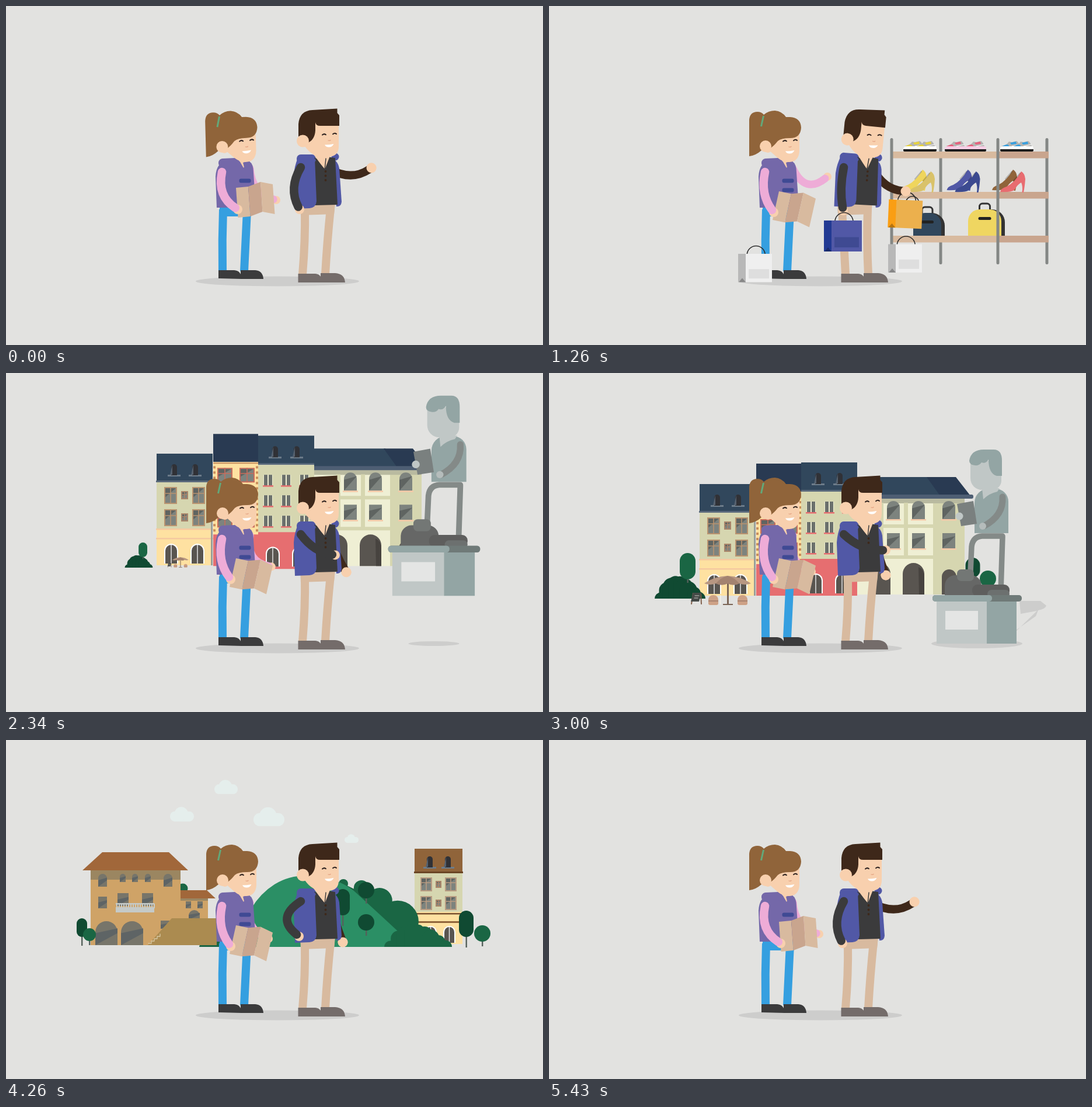
An HTML page with a canvas that plays this animation: 920 by 580 pixels, repeating every 5.46 s.

```html
<!DOCTYPE html>
<html>
<head>
<meta charset="utf-8">
<style>
html, body { margin: 0; width: 100%; height: 100%; overflow: hidden; background: #e2e2e0; }
canvas { display: block; }
</style>
</head>
<body>
<canvas id="stage" width="920" height="580"></canvas>
<script>
const g = document.getElementById('stage').getContext('2d');
const LOOP = 5460;
const SKIN = '#f8d0ae', DARK = '#3b3b3c', BROWN = '#3e281a', BLUE = '#5158a6', PINK = '#eeacd7', JEANS = '#359fe0',
  TAN = '#d8ba9f', TAN2 = '#c9a58e', SAND = '#d6d6b0', CREAM = '#efefd4', YELLOW = '#fee1a1', RED = '#e66e70',
  NAVY = '#31475c', NAVY2 = '#293a52', SHADE = '#cdcdcc', PINE = '#104a32', LEAF = '#1a6644',
  STONE = '#93a5a4', PALE = '#c0c7c6', IRON = '#848a88', ROOF = '#90643a', GLASS = '#7d837e', GLASS2 = '#5f6461';
let t = 0;

// ---- drawing helpers
function fill(d, color) { g.fillStyle = color; g.fill(new Path2D(d)); }
function line(d, color, w, cap = 'round') {
  g.strokeStyle = color; g.lineWidth = w; g.lineCap = cap; g.lineJoin = 'round';
  g.stroke(new Path2D(d));
}
function box(x, y, w, h, color, r = 0) {
  g.fillStyle = color; g.beginPath(); g.roundRect(x, y, w, h, r); g.fill();
}
function oval(x, y, rx, ry, color) {
  g.fillStyle = color; g.beginPath(); g.ellipse(x, y, rx, ry, 0, 0, 7); g.fill();
}
const dot = (x, y, r, color) => oval(x, y, r, r, color);
const arch = (x, y, w, h, color) => box(x, y, w, h, color, [w / 2, w / 2, 0, 0]);
function group(px, py, s, dx, dy, draw, angle = 0) {
  if (s <= 0) return;
  g.save();
  g.translate(px + dx, py + dy);
  g.rotate(angle * Math.PI / 180);
  g.scale(s, s);
  g.translate(-px, -py);
  draw();
  g.restore();
}

// ---- timing helpers
const part = (start, len) => Math.min(1, Math.max(0, (t - start) / len));
function pop(start, len = 260) {
  const q = 1 - part(start, len);
  return q < 1 ? 1 + 1.7 * q * q - 2.7 * q ** 3 : 0;
}
const drop = (start, height, len = 300) => -height * (1 - part(start, len) ** 3);
const pan = start => -950 * part(start, 450) ** 3;

// Poses for waiting, shop, town and hill; each cue eases to the next one.
const CUES = [150, 1750, 3100, 4600];
function pose(stances, len = 810) {
  return stances[0].map((first, j) => CUES.reduce((v, cue, i) => {
    const p = part(cue, len);
    return v + (stances[(i + 1) % 4][j] - stances[i][j]) * p * p * (3 - 2 * p);
  }, first));
}

// ---- shop
function sneaker(x, accent, mid) {
  group(0, 0, 1, x, 249, () => {
    box(0, -5, 37, 5, '#1c1c1c', 2);
    fill('M0 -4Q0 -9 6 -9H36L37 -4Z', mid);
    fill('M2 -9Q11 -11 15 -17L20 -16L28 -18Q31 -17 34 -9Z', '#b4b4b2');
    fill('M3 -9Q9 -12 13 -12L16 -9ZM17 -15L27 -17L28 -13L19 -12Z', accent);
    line('M20 -9L33 -12', '#fff', 1);
  });
}
function heel(x, y, color) {
  group(0, 0, 1, x, y, () => {
    fill('M0 -1Q1 -7 11 -10Q25 -17 36 -36Q42 -33 43 -23Q42 -9 40 0H37.5Q39 -11 36 -17Q30 -14 24 -4Q18 0 0 -1Z', color);
    line('M23 -20L34 -33', '#0003', 2);
  });
}
function purse(x, top, w, color) {
  const h = 393 - top, c = x + w / 2;
  g.strokeStyle = '#333'; g.lineWidth = 3;
  g.beginPath(); g.roundRect(c - 9, top - 10, 18, 16, 5); g.stroke();
  box(x + 10, top, w - 4, h, '#333', [18, 22, 0, 0]);
  box(x, top, w, h, color, [20, 20, 0, 0]);
  box(c - 11, top + 13, 22, 5, '#222', 2.5);
}
function bag(x, y, w, h, side, front, label) {
  const c = x + w * .53, r = 15.5;
  line(`M${c - r} ${y + 2}A${r} ${r} 0 0 1 ${c + r} ${y + 2}`, '#2c2c2c', 1.6);
  box(x, y, 14, h, side);
  box(x + 13, y, w - 13, h, front);
  fill(`M${x + 1} ${y + h}l6 -7l6 7Z`, '#0004');
  if (label) box(x + 18, y + h * .54, w - 23, h * .33, label);
}
function whiteBag(x, y, start) {
  group(x + 29, y + 48, pop(start), pan(1652), 0, () => bag(x, y, 58, 48.5, '#b8b8b8', '#efefef', '#dedede'));
}
const heldBag = start => Math.min(pop(start), 1 - part(1680, 220));
const post = x => box(x - 2.5, 226, 5, 216, '#848785', 2.5);
function shop() {
  group(720, 334, pop(60), pan(1652), drop(340, 97), () => {
    post(671); post(853);
    for (const y of [249, 318, 393]) {
      box(585, y, 184, 11.5, TAN);
      box(769, y, 87, 11.5, TAN2);
    }
    [['#e8d33c', '#fff'], ['#e8607e', '#f8cfe6'], [JEANS, '#fff']].forEach(([accent, mid], i) => {
      const x = 607 + i * 83 - i % 2 * 12, gap = 20 + i % 2 * 14;
      group(x + 28, 249, pop(430 + i * 50), 0, 0, () => { sneaker(x, accent, mid); sneaker(x + gap, accent, mid); });
    });
    [['#efd55c', '#d9c26a'], [BLUE, '#3c4a90'], [ROOF, '#e86c70']].forEach(([rear, front], i) => {
      const x = 618 + i * 77.5;
      group(x + 15, 318, pop(500 + i * 50), 0, 0, () => { heel(x - 14, 316, rear); heel(x, 319, front); });
    });
    group(650, 393, pop(560), 0, 0, () => purse(624, 354, 48, NAVY));
    group(748, 393, pop(610), 0, 0, () => purse(718, 348, 57, '#efd661'));
    post(587); post(769);
  });
  whiteBag(581, 407.5, 520);
}

// ---- town
function win(x, y, w, h, frame) {
  box(x, y, w, h, frame);
  box(x + 2, y + 2, w - 4, h - 4, GLASS);
  fill(`M${x + 2} ${y + h * .6}L${x + w - 2} ${y + 2}H${x + 2}Z`, GLASS2);
  box(x + w / 2 - .8, y, 1.6, h, frame);
  box(x, y + h * .35, w, 1.5, frame);
}
function dormer(x, y) {
  box(x - 11, y, 22, 3, '#6d7c8a');
  arch(x - 5, y - 18, 10, 19, '#303136');
  fill(`M${x - 7} ${y}l4 -17v17Z`, '#55616f');
}
function shopArch(x, y, w = 24, h = 34) {
  arch(x, y, w, h, '#fff');
  arch(x + 2, y + 2, w - 4, h - 2, '#595550');
  box(x + w / 2 - .7, y + 2, 1.4, h - 2, '#eee');
}
function tallWindow(x, y, h, shape) {
  shape(x, y, 22, h, GLASS);
  fill(`M${x} ${y + h}V${y + h * .4}L${x + 22} ${y + h * .2}Z`, GLASS2);
  box(x - 2, y + h, 26, 2.5, '#f5c9a8');
}
function houseA() {
  box(258, 190, 96, 47, NAVY);
  box(257, 236, 98, 3, '#5b6a7c');
  box(258, 239, 96, 80, SAND);
  box(258, 319, 96, 62, YELLOW);
  for (const y of [318, 334]) box(257, y, 98, 2.5, '#f5c9a0');
  for (const x of [288, 324]) dormer(x, 226);
  for (const y of [247, 285]) {
    for (const x of [271, 319]) win(x, y, 22, 29, '#b9936f');
    win(300, y + 7, 12, 14, '#a9856a');
  }
  shopArch(271, 344); shopArch(316, 344);
  box(351, 239, 3, 142, '#9aa09a');
}
function houseB() {
  box(355, 155, 77, 48, NAVY2);
  box(355, 203, 77, 125, YELLOW);
  box(355, 204, 77, 2, '#c98f5c');
  for (let y = 210; y < 326; y += 9) for (const x of [355, 428]) box(x, y, 4, 4, '#c98f5c');
  for (const y of [213, 250, 290]) for (const x of [362, 400]) win(x, y, 26, 25, '#c96c5c');
  box(355, 327, 77, 54, RED);
}
function houseC() {
  box(432, 153, 96, 48, NAVY);
  box(432, 200, 96, 3, '#5b6a7c');
  box(432, 203, 96, 115, SAND);
  box(432, 318, 96, 63, RED);
  for (const x of [461, 498]) dormer(x, 189);
  for (const y of [220, 255, 290]) for (const x of [441, 472, 503]) {
    box(x, y, 16, 19, CREAM);
    for (const pane of [1, 9]) box(x + pane, y, 6, 19, '#6b706c');
    box(x - 1, y + 18, 18, 2.5, RED);
  }
  shopArch(445, 343); shopArch(490, 343);
}
function houseD() {
  box(528, 209, 130, 170, CREAM);
  box(658, 209, 54, 170, SAND);
  box(528, 214, 184, 9, '#b9baa0');
  fill('M528 178H650L672 210H528Z', NAVY);
  fill('M647 178H697L722 210H670Z', NAVY2);
  box(528, 208, 199, 7, '#4e5e73', [0, 3, 3, 0]);
  for (const y of [259, 312]) box(528, y, 130, 6, SAND);
  for (const x of [566, 608]) box(x, 222, 7, 94, SAND);
  for (const x of [579, 622, 674]) { tallWindow(x, 219, 31, arch); tallWindow(x, 274, 26, box); }
  for (const x of [548, 606]) arch(x, 325, 37, 54, '#595550');
  fill('M633 332Q643 336 643 350V379H634Z', '#47433f');
  arch(673, 336, 25, 43, '#595550');
}
function tree(x, y, w, h, trunk, color) {
  box(x - 1, y + h / 2, 2.4, trunk - y - h / 2, '#55605a');
  box(x - w / 2, y, w, h, color, w / 2);
}
// A mound of overlapping leaf balls on a flat base.
function clump(x, w, base, h, color, lean = .8) {
  for (let i = 0; i <= 8; i++) {
    const u = i / 8, r = h * (.27 + .13 * Math.sin(i * 2.3) ** 2);
    const cx = x + r + (w - 2 * r) * u, cy = base - (h - r) * Math.sin(Math.PI * u ** lean);
    box(cx - r, cy - r, 2 * r, base - cy + r, color, [r, r, 0, 0]);
  }
}
function bush() {
  clump(181, 87, 386, 39, PINE);
  tree(237.5, 308, 27, 45, 359, LEAF);
}
function cafe() {
  box(305, 355, 3, 41, '#7b6556');
  box(298, 395, 17, 2, '#7b6556');
  for (const x of [273, 323]) { box(x, 380, 17, 17, '#cda186', [8, 8, 3, 3]); box(x, 389, 17, 2, '#a98470'); }
  box(293, 380, 1.5, 16, '#f4f1e8');
  fill('M266 360Q283 348 306 347Q329 348 346 360q-10 4 -20 0q-10 5 -20 0q-10 5 -20 0q-10 4 -20 0Z', '#b79782');
  fill('M286 360Q294 350 306 347Q318 350 326 360q-10 5 -20 0q-10 5 -20 0Z', '#a38370');
  line('M247 377L244 395M260 377L261 395', '#82614d', 2);
  fill('M247 376H261L257 391H243Z', '#454a47');
  line('M250 381h7M249 385h6', '#c9c9c4', 1);
}
function statue() {
  line('M777 279H742Q726 280 724 297L722 341M777 280L774 374', IRON, 9.5);
  box(678, 346, 63, 36, '#666766', [18, 18, 0, 0]);
  box(699, 336, 29, 20, '#737775', 7);
  box(725, 362, 64, 20, '#5e5e5d', 9);
  box(751, 371, 38, 14, '#6c706f', 7);
  box(664, 390, 87, 73, PALE);
  box(750, 390, 51, 73, STONE);
  box(657, 380, 153, 11, '#6f7a78', 5);
  box(657, 380, 102, 11, STONE, 5);
  box(679, 407, 56, 32, '#e4e5e4');
  box(722, 150, 53, 50, PALE, [0, 0, 16, 20]);
  box(729, 198, 58, 76, STONE, [24, 22, 0, 0]);
  fill('M742 197H772L768 203Q754 206 744 216Z', PALE);
  fill('M720 150Q723 131 745 131H762Q776 131 776 150V176H767Q753 172 753 148Q748 156 741 153Q737 159 730 158Q720 157 720 150Z', STONE);
  fill('M699 224L727 219L733 258L706 262Z', '#7a807f');
  line('M777 212Q779 244 745 262', IRON, 11);
  dot(743, 262, 6, '#b5bcbb');
  dot(703, 245, 6.5, PALE);
}
function town() {
  const dx = pan(3110), fall = part(2380, 250) ** 3, grow = pop(2130, 250);
  group(745, 366, pop(2380), dx, 0, () => {
    tree(726, 316, 25, 34, 380, PINE);
    dot(752, 352, 14, LEAF);
  });
  [[houseC, 480], [houseD, 620], [houseB, 393], [houseA, 306]].forEach(([house, x], i) =>
    group(x, 381, pop(2050 + i * 15, 230), dx, drop(2187 + i * 24, 53), house));
  group(231, 386, pop(2298, 300), dx, drop(2330, 53), bush);
  group(295, 372, pop(2316, 300), dx, drop(2330, 48), cafe);
  if (grow > 0) oval(733 + dx, 463, 78 * (.56 * Math.min(1, grow) + .44 * fall), 4 + 4 * fall, SHADE);
  group(800, 440, fall, dx, 0, () => fill('M798 444L836 407L808 412L806 390H842L852 398Q850 404 838 406L834 416L800 440Z', SHADE));
  group(733, 297, grow, dx, drop(2380, 87, 250), statue);
}

// ---- hill
function hill() {
  clump(331, 116, 354, 34, LEAF);
  fill('M580 247L690 300L707 354H600Z', LEAF);
  for (let i = 0; i < 4; i++) dot(578 + 31 * i, 246 + 7.2 * i * i, 8 * 1.65 ** i, LEAF);
  tree(548, 185, 26, 45, 231, PINE);
  fill('M395 354Q412 277 460 247Q484 232 515 232Q562 232 596 258Q640 298 682 337V354Z', '#2b8f65');
  tree(577, 255, 24, 45, 318, PINE);
  for (const y of [243, 298]) tree(617, y, 28, 28, y + 37, PINE);
  clump(648, 116, 354, 39, LEAF);
  tree(788.5, 292, 25, 45, 355, PINE);
  tree(816, 317, 28, 28, 353, LEAF);
}
function tower() {
  box(700, 186, 82, 40, ROOF);
  box(699, 225, 84, 3, '#6b4626');
  box(700, 228, 82, 66, SAND);
  box(700, 294, 82, 55, YELLOW);
  box(699, 296, 84, 2.5, '#7b5230');
  box(700, 310, 82, 3, ROOF);
  for (const x of [726, 757]) dormer(x, 217);
  for (const y of [235, 267]) {
    for (const x of [710, 752]) win(x, y, 20, 24, '#b99c82');
    win(736, y + 6, 10, 12, '#a9856a');
  }
  for (const x of [717, 749]) shopArch(x, 318, 21, 29);
}
function pane(x, y, w, h, shape = box) {
  shape(x, y, w, h, '#77756a');
  fill(`M${x} ${y + h}V${y + h * .5}L${x + w} ${y + h * .3}V${y + h * .5}Z`, '#5e6465');
}
function villa() {
  dot(303, 254, 8.5, LEAF);
  box(299, 270, 47, 60, '#cfa367');
  fill('M286 271L299 257H344L359 271Z', '#a1673a');
  box(299, 271, 47, 4, '#9b8661');
  for (const x of [308, 328]) pane(x, 276, 9, 12);
  pane(313, 291, 19, 16, arch);
  box(145, 222, 154, 129, '#cfa367');
  box(145, 223, 154, 16, '#9b8661');
  fill('M131 223L165 192H279L312 223Z', '#a1673a');
  for (const x of [158, 270]) pane(x, 229, 15, 22, arch);
  for (const x of [195, 216, 238]) pane(x, 229, 10, 14, arch);
  pane(158, 268, 15, 20);
  pane(265, 309, 15, 14);
  for (const x of [191, 233]) pane(x, 262, 19, 22);
  box(188, 279, 66, 2.5, '#c5cac8');
  box(188, 286, 66, 9, '#c5cac8');
  for (let x = 189; x < 254; x += 4) box(x, 280, 2, 8, '#c5cac8');
  for (const x of [153, 197]) pane(x, 310, 38, 41, arch);
  fill('M243 351L284 305H361V351Z', '#ab8b50');
  line('M244 348h5v-4h5v-4h5v-4h5v-4', '#d9c9a4', 1.3);
  tree(130, 305, 18, 32, 352, PINE);
  tree(143, 322, 22, 22, 351, LEAF);
}
function cloud(x, y, w, start) {
  const s = Math.min(pop(start, 300), 1 - .85 * part(4900, 400));
  group(x - w * .36, y, s, pan(4957), 0, () => {
    box(x - w / 2, y - w * .13, w, w * .42, '#e5eeec', w * .2);
    dot(x - w * .03, y - w * .04, w * .28, '#e5eeec');
  });
}
function hillScene() {
  const dx = pan(4957), dy = drop(3875, 53);
  [[377, 81, 40], [592, 169, 24], [301.5, 127.5, 41], [450.5, 132, 53]].forEach((c, i) => cloud(...c, 3666 + 9 * i));
  group(741, 349, pop(3608, 340), dx, dy, tower);
  group(548, 354, pop(3450, 240), dx, dy, hill);
  group(243, 351, pop(3638, 380), dx, dy, villa);
}

// ---- people
// The elbow is pushed sideways from the line between shoulder and hand.
function arm(x, y, [hx, hy, bend], color, w, r) {
  const len = Math.hypot(hx - x, hy - y);
  const cx = (x + hx - 2 * bend * (hy - y) / len) / 2, cy = (y + hy + 2 * bend * (hx - x) / len) / 2;
  const cut = 5 / Math.hypot(hx - cx, hy - cy);
  dot(hx, hy, r, SKIN);
  line(`M${x} ${y}Q${cx} ${cy} ${hx + (cx - hx) * cut} ${hy + (cy - hy) * cut}`, color, w);
}
function face(x, y) {
  line(`M${x} ${y}q3 -2.6 6 -.3m12 -1q3 -2.6 6 -.3`, '#2f2320', 2);
  line(`M${x + 10} ${y + 9.5}q2.5 1 4 -.5`, '#e3a283', 1.3);
  fill(`M${x + 4} ${y + 17}q8 0 15.5 -1.500q-2.500 5.500 -8.500 5.500q-5 0 -7 -4Z`, '#fff');
}
function mapSheet(low) {
  const dx = 3.5 - 14.5 * low, dy = 51 - 2 * low;
  const top = i => [394 + 21 * i, 311 + 6 * low + i * (6.2 * low - 2) - (i === 2 ? 6 : 0)];
  for (let i = 0; i < 3; i++) {
    const [x, y] = top(i), [x2, y2] = top(i + 1);
    fill(`M${x} ${y}L${x2} ${y2}l${dx} ${dy}L${x + dx} ${y + dy}Z`, i === 1 ? TAN2 : TAN);
  }
}
function girl() {
  const [low] = pose([[0], [1], [1], [1]]);
  arm(418, 278, pose([[463, 332, 25], [477, 292, 38], [450, 340, 30], [450, 340, 30]]), PINK, 13, 7);
  line('M372 348Q370 400 371 453M413 350L408 454', JEANS, 14, 'butt');
  box(366, 344, 54, 16, JEANS);
  fill('M364 452H391Q403 453 404 467L364 466Z', DARK);
  fill('M402 452H427Q440 453 441 467H402Z', DARK);
  fill('M361 345L359 292Q360 268 378 266H417Q424 270 424 285L428 345Z', '#7468a9');
  fill('M396 258H418L407 277Z', SKIN);
  group(382, 268, 1, 0, 0, () => box(364, 260.5, 36, 15, '#7468a9', 7), -3);
  fill('M406 268L417 264L418 273L408 276Z', '#7468a9');
  for (const y of [295.5, 311.5]) box(399.5, y, 20, 7, '#3f4a94', 3);
  group(405, 265, 1, 0, 0, () => {
    fill('M375 220H429V248Q428 266 412 267Q402 268 392 260L376 246Z', SKIN);
    fill('M343 195Q344 181 357 181Q364 181 368 186Q376 179 387 179Q399 180 406 190H413Q431 191 432 208Q431 226 413 226Q398 226 392 231Q384 241 379 243L370 240L364 247Q354 256 343 257Z', ROOF);
    line('M367.5 188L363.5 206', '#62a97a', 3, 'butt');
    dot(371, 240, 10, SKIN);
    dot(375, 245, 6, SKIN);
    face(401, 231.5);
  }, 1.5 * part(0, 700) - 1.5);
  mapSheet(low);
  arm(370, 284, pose([[397, 348, 24], [385, 353, 16], [385, 353, 16], [385, 353, 16]]), PINK, 14.5, 8);
}
function man() {
  const [lean] = pose([[0], [1], [0], [0]], 450), hip = -10 * lean;
  const back = pose([[626, 277, 21], [611, 317, 18], [577, 346, 2], [577, 346, 2]]);
  const front = pose([[503, 348, 20], [504, 350, 7], [577, 303, 16], [502, 336, 42]]);
  const [bx, by] = back, [fx, fy] = front;
  arm(556, 280, back, BROWN, 14, 8.5);
  group(bx, by, heldBag(640), 0, 0, () => {
    line(`M${bx + 1} ${by + 18}a12 14 0 0 1 23 0`, '#2c2c2c', 1.6);
    bag(bx - 28, by + 15, 58, 48, '#fa9e13', '#ecb04d');
  }, 2.5);
  dot(bx, by, 8.5, SKIN);
  line(`M${512 + hip} 348Q${513 + hip * .8} 400 508 459M${556 + hip} 346Q${550 + hip * .6} 405 547 459`, TAN, 14, 'butt');
  fill(`M${504 + hip} 338h60l-2 18l-57 2Z`, TAN);
  fill('M500.5 458H530Q541 459 542 473H500.5Z', '#746c6a');
  fill('M539 457H564Q580 458 581 473H539Z', '#746c6a');
  group(545, 262, 1, 0, 0, () => {
    fill('M556 262Q568 262 571 278L575 335Q574 344 566 343Z', BLUE);
    dot(564, 258, 6.5, BLUE);
    fill('M526 262L545 257L564 260L568 340L529 341Z', DARK);
    fill('M500 260H529L532 334Q531 345 520 346L495 347L493 290Q494 274 500 260Z', BLUE);
    box(498, 254, 33, 15, BLUE, 7);
    fill('M527 254H556L546 280Z', SKIN);
    line('M529 260L546 280L548 261', DARK, 1.5);
    for (let i = 0; i < 3; i++) dot(547.5, 283 + 7.5 * i, 1.9, BROWN);
  }, 4.5 * lean);
  group(540, 258, 1, 0, 0, () => {
    fill('M522 198H570V240Q570 257 553 258Q527 262 512 240Z', SKIN);
    fill('M501 226V202Q503 179 525 178L567.5 175.5V183L571 187V205H538Q531 205 530 199V213Q529 229 517 234Z', BROWN);
    dot(508.5, 231, 10.5, SKIN);
    face(542, 220.5);
  }, 5.5 * lean);
  arm(505, 276, front, DARK, 14.5, 8);
  group(fx, fy, heldBag(600), 0, 0, () => bag(fx - 33, fy + 17, 65, 53, '#223a93', BLUE, '#3f4a92'));
}

function frame() {
  t = performance.now() % LOOP;
  box(0, 0, 920, 580, '#e2e2e0');
  oval(465, 471, 140, 8.5, SHADE);
  shop();
  town();
  hillScene();
  girl();
  man();
  whiteBag(324, 424, 450);
  requestAnimationFrame(frame);
}
frame();
</script>
</body>
</html>
```
